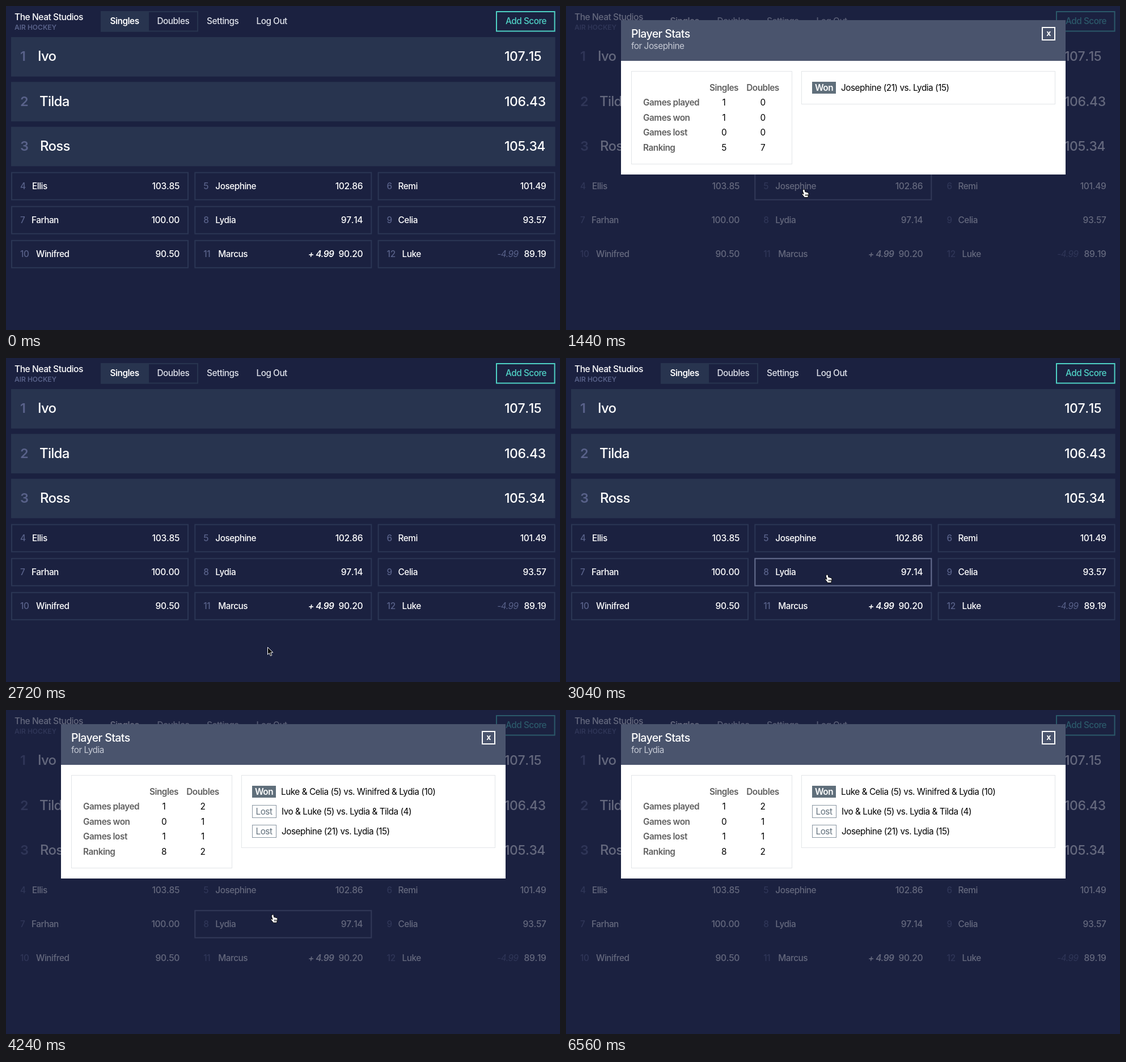
These frames come from a looping animation (977x573 px, 6.64 s). An HTML page:

```html
<!DOCTYPE html>
<html lang="en">
<head>
<meta charset="utf-8">
<title>Air hockey rankings</title>
<style>
  html, body { margin: 0; width: 100%; height: 100%; overflow: hidden; background: #1b2140; }
  svg { display: block; }
  text { font-family: Inter, "Open Sans", sans-serif; letter-spacing: -.03em; white-space: pre; }
  .num { font-kerning: none; letter-spacing: -.02em; }
  .wide { letter-spacing: 0; }
</style>
</head>
<body>
<svg id="stage" width="977" height="573" viewBox="0 0 977 573"></svg>
<script>
const LOOP = 6640, STEP = 80;
const BG = '#1b2140', CARD = '#28344f', EDGE = '#2b3654', DIM = '#59628a', TEAL = '#4fd1c5', GREY = '#606f7b';

const text = (x, y, s, { size = 15.3, weight = 500, fill = '#fff', anchor = 'start', extra = '' } = {}) =>
  `<text x="${x}" y="${y}" font-size="${size}" font-weight="${weight}" fill="${fill}" text-anchor="${anchor}" ${extra}>${s.replace(/&/g, '&amp;')}</text>`;
const box = (x, y, w, h, fill) => `<rect x="${x}" y="${y}" width="${w}" height="${h}" fill="${fill}"/>`;
// Outline whose outer edge is the given box
const frame = (x, y, w, h, stroke, line = 2, id = '') =>
  `<rect id="${id}" x="${x + line / 2}" y="${y + line / 2}" width="${w - line}" height="${h - line}" fill="none" stroke="${stroke}" stroke-width="${line}"/>`;

const leaders = [['Ivo', '107.15', 56], ['Tilda', '106.43', 59], ['Ross', '105.34', 60]];
const others = [
  ['Ellis', '103.85'], ['Josephine', '102.86'], ['Remi', '101.49'],
  ['Farhan', '100.00'], ['Lydia', '97.14'], ['Celia', '93.57'],
  ['Winifred', '90.50'], ['Marcus', '90.20', '+ 4.99'], ['Luke', '89.19', '-4.99']
];
const nameGap = [37, 37, 36, 36, 37, 36, 44, 42, 43];
const TILE_W = 313, TILE_H = 50;
const tile = i => [9 + i % 3 * 323.3, 293.6 + (i / 3 | 0) * 60.1];

function board() {
  let cards = box(167, 9, 85, 36.5, CARD) + frame(167, 9, 172, 36.5, CARD);
  let words = text(15, 25, 'The Neat Studios', { size: 15.6 })
    + text(15, 42, 'AIR HOCKEY', { size: 12, weight: 600, fill: DIM, extra: 'class="wide"' })
    + text(183.5, 32, 'Singles', { weight: 600 });
  [[266.5, 'Doubles'], [354, 'Settings'], [441.5, 'Log Out']].forEach(([x, s]) =>
    words += text(x, 32, s, { fill: '#dfe2ea' }));
  words += frame(864, 9, 104.6, 36.5, TEAL) + text(881, 32, 'Add Score', { fill: TEAL });

  leaders.forEach(([name, score, x], i) => {
    const y = 55 + i * 79.3, base = y + 42.3;
    cards += box(9, y, 959.6, 69.7, CARD);
    words += text(25, base, `${i + 1}`, { size: 23.5, weight: 600, fill: DIM })
      + text(x, base, name, { size: 24 })
      + text(879, base, score, { size: 23, extra: 'class="num"' });
  });
  others.forEach(([name, score, change], i) => {
    const [x, y] = tile(i), base = y + 30.2, up = i === 7;
    cards += frame(x, y, TILE_W, TILE_H, EDGE);
    words += text(x + 16, base, `${i + 4}`, { fill: DIM, extra: 'class="num"' })
      + text(x + nameGap[i], base, name)
      + text(x + 297, base, score, { size: 15.6, anchor: 'end', extra: 'class="num"' });
    if (change) words += text(x + (up ? 246 : 248), base, change, {
      anchor: 'end', weight: up ? 600 : 400, fill: up ? '#fff' : DIM, extra: 'font-style="italic"'
    });
  });
  return `<g id="cards">${cards}</g>${frame(0, 0, TILE_W, TILE_H, '#646c8d', 2, 'hover')}${words}`;
}

function modal(id, name, stats, games) {
  let s = box(97, 25, 784, 273, '#fff') + box(97, 25, 784, 72, '#4a546d')
    + text(115, 56, 'Player Stats', { size: 19.5 })
    + text(115, 76, `for ${name}`, { weight: 400, fill: '#c6cad5' })
    + frame(839, 37, 24, 24, '#fff') + text(851, 53, 'x', { weight: 700, size: 14, anchor: 'middle' })
    + frame(115, 115, 284, 165, '#e2e5e8', 1)
    + frame(415, 115, 448, 24 + games.length * 35, '#e2e5e8', 1);
  const label = { weight: 600, fill: '#606060' };
  ['Singles', 'Doubles'].forEach((t, c) => {
    const x = 278.5 + c * 68.5;
    s += text(x, 150, t, { ...label, anchor: 'middle' });
    stats[c].forEach((v, r) => s += text(x, 176 + r * 26.7, `${v}`, { weight: 400, fill: '#000', anchor: 'middle' }));
  });
  ['Games played', 'Games won', 'Games lost', 'Ranking'].forEach((t, r) => s += text(136, 176 + r * 26.7, t, label));
  games.forEach(([won, line], i) => {
    const y = 150 + i * 35;
    s += won ? box(434, y - 16, 42, 21, GREY) : frame(434, y - 17, 43, 23, '#8795a1', 1);
    s += text(455, y, won ? 'Won' : 'Lost', { weight: won ? 600 : 400, fill: won ? '#fff' : GREY, anchor: 'middle' })
      + text(won ? 485 : 486, y, line, { weight: 400, fill: '#000' });
  });
  return `<g id="${id}">${s}</g>`;
}

const last = 'Josephine (21) vs. Lydia (15)';
stage.innerHTML = board()
  + `<rect id="veil" width="977" height="573" fill="${BG}"/>`
  + modal('first', 'Josephine', [[1, 1, 0, 5], [0, 0, 0, 7]], [[true, last]])
  + modal('second', 'Lydia', [[1, 0, 1, 8], [2, 1, 1, 2]], [
    [true, 'Luke & Celia (5) vs. Winifred & Lydia (10)'],
    [false, 'Ivo & Luke (5) vs. Lydia & Tilda (4)'],
    [false, last]
  ])
  + `<path id="hand" fill="#fff" stroke="#000" stroke-linejoin="round" d="M3.5 1.5q1.5-1.5 2.5.5l1 4q1.5-.8 2 .5 1.5-.6 2 .5 1.8-.3 1.9 1l.1 3-1.4 4.5h-6l-4-5q-1.5-2 .3-2.2l2.3 1.5-2-6q-.2-1.3 1.3-1.8zM7.500 10v3M9.500 10v3M11.300 10v3"/>`
  + `<path id="arrow" stroke="#fff" stroke-linejoin="round" d="M.5.5v13l3-2.8 2 5 2.3-1-2-4.8h4.2z"/>`;

const $ = id => document.getElementById(id);
const show = (id, on) => $(id).setAttribute('opacity', +on);

// Pointer route: time, x, y
const route = [
  [0, 400, 575], [80, 400, 575], [320, 400, 520], [640, 400, 520], [880, 326, 424], [1040, 326, 424],
  [1280, 415, 323], [1760, 415, 323], [1920, 440, 300], [2000, 440, 300], [2400, 461, 511], [2720, 461, 511],
  [3040, 456, 382], [4160, 456, 382], [4880, 545, 190], [5200, 533, 254], [5360, 527, 329],
  [5600, 527, 329], [5920, 515, 576], [LOOP, 515, 576]
];

function pointer(t) {
  const i = route.findIndex(k => k[0] > t), [t0, x0, y0] = route[i - 1], [t1, x1, y1] = route[i];
  const f = (t - t0) / (t1 - t0);
  return [x0 + (x1 - x0) * f, y0 + (y1 - y0) * f];
}

function draw(now) {
  const t = Math.floor(now % LOOP / STEP) * STEP;
  const p1 = +(t >= 1440 && t < 2720), p2 = t < 3760 ? 0 : t < 3840 ? .6 : 1, p = p1 || p2;
  const [x, y] = pointer(t);

  let hot = others.findIndex((_, i) => {
    const [left, top] = tile(i);
    return x + 4 > left && x + 4 < left + TILE_W && y > top && y < top + TILE_H;
  });
  let link = hot >= 0;
  if (p) {
    hot = t < 2160 ? 1 : t >= 3760 && t < 5680 ? 4 : -1;
    link = t < 1840 || t < 4240 && t >= 3760 || y > 298;
  }
  show('hover', hot >= 0);
  if (hot >= 0) {
    const [left, top] = tile(hot);
    $('hover').setAttribute('transform', `translate(${left} ${top})`);
  }
  show('cards', 1 - p);
  show('veil', p * .68);
  show('first', p1);
  show('second', p2);
  for (const [id, on] of [['hand', link], ['arrow', !link]]) {
    show(id, on);
    $(id).setAttribute('transform', `translate(${x} ${y})`);
  }
  requestAnimationFrame(draw);
}
requestAnimationFrame(draw);
</script>
</body>
</html>
```
